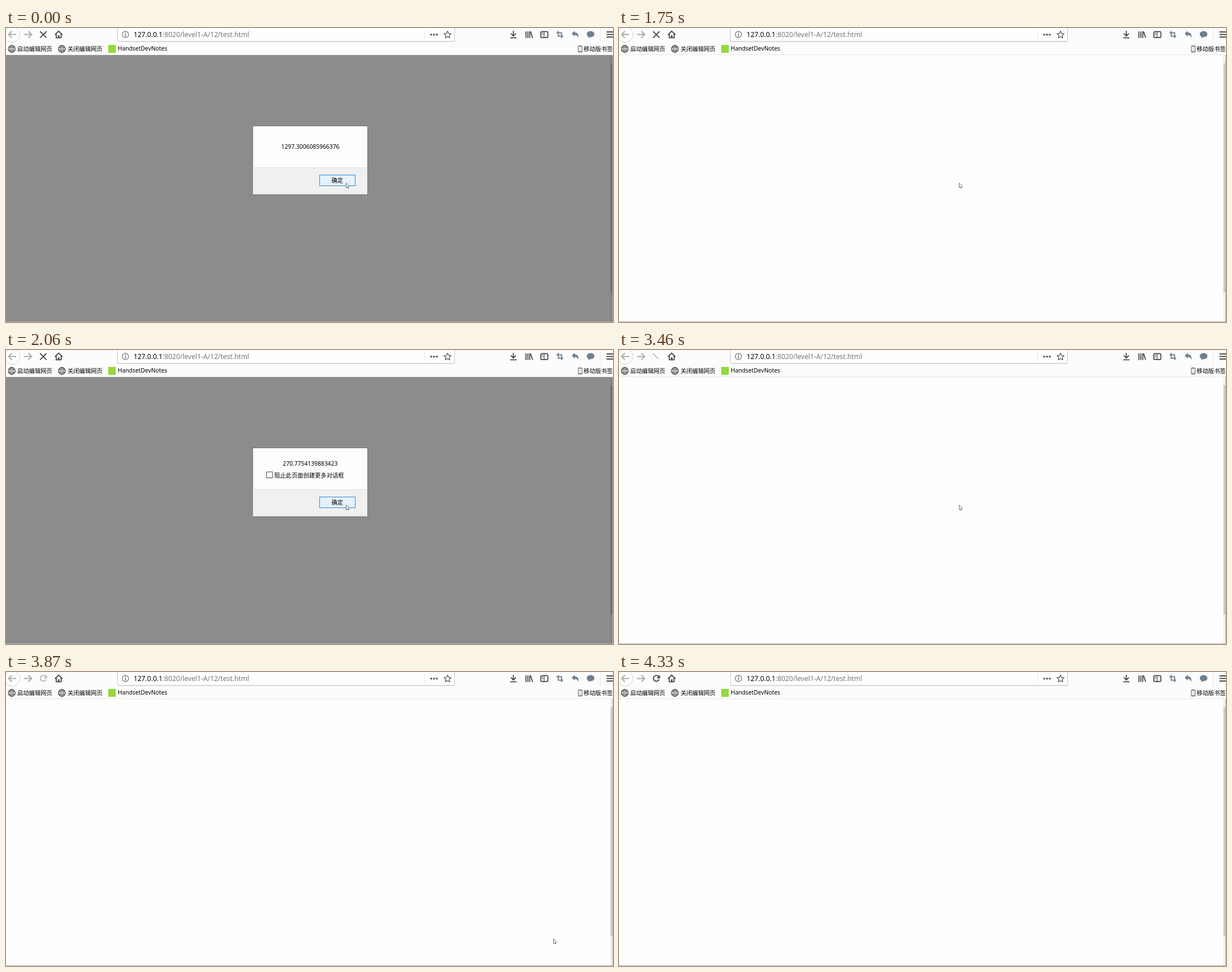
Animation of 1075x521 px, one loop 4.79 s. Source, as an HTML page:

```html
<!DOCTYPE html>
<html lang="zh-CN">
<head>
<meta charset="utf-8">
<title>Alert loop</title>
<style>
html, body { margin: 0; width: 100%; height: 100%; overflow: hidden; background: #fefefe; }
svg { display: block; width: 100%; height: 100%; }
text { font: 10.3px "Noto Sans", "Noto Sans CJK SC", "Noto Sans CJK", "Noto Sans CJK JP", sans-serif; fill: #000; white-space: pre; }
.url { font-size: 12.1px; }
.mid { text-anchor: middle; }
.line { fill: none; stroke: #47474b; stroke-width: 1.8; }
.thin { stroke-width: 1.2; }
.dim { stroke: #aaaaac; }
.steel { fill: #6f7f8f; }

/* 4790 ms loop, hard cuts */
.cut { animation: 4790ms step-end infinite; }
.modal { animation-name: modal; }
.first { animation-name: first; }
.second { animation-name: second; }
.button { fill: #e5f1fb; stroke: #2a8ad9; animation-name: press; }
.stop { animation-name: stop; }
.fade { animation-name: fade; }
.draw { animation-name: draw; }
.pale { animation-name: pale; }
.reload { animation-name: reload; }
.cursor { animation-name: point; }

@keyframes modal {
  0%, 43.006% { visibility: visible; }
  36.534%, 72.233%, 100% { visibility: hidden; }
}
@keyframes first {
  0% { visibility: visible; }
  36.534%, 100% { visibility: hidden; }
}
@keyframes second {
  0%, 72.233%, 100% { visibility: hidden; }
  43.006% { visibility: visible; }
}
@keyframes press {
  0% { fill: #e5f1fb; stroke: #2a8ad9; }
  64.718%, 100% { fill: #cce4f7; stroke: #2a6fa8; }
}
@keyframes stop {
  0% { visibility: visible; }
  72.233%, 100% { visibility: hidden; }
}
@keyframes fade {
  0%, 75.156%, 100% { visibility: hidden; }
  72.233% { visibility: visible; }
}
@keyframes draw {
  0%, 80.793%, 100% { visibility: hidden; }
  75.156% { visibility: visible; }
}
@keyframes pale {
  0%, 83.716%, 100% { visibility: hidden; }
  80.793% { visibility: visible; }
}
@keyframes reload {
  0% { visibility: hidden; }
  83.716%, 100% { visibility: visible; }
}
@keyframes point {
  0% { transform: translate(602px, 274px); }
  80.793% { transform: translate(969px, 472px); }
  83.716% { transform: translate(1033px, 513px); }
  90.396%, 100% { transform: translate(1100px, 600px); }
}
</style>
</head>
<body>
<svg viewBox="0 0 1075 521" preserveAspectRatio="none">
  <defs>
    <g id="globe" fill="none" stroke="#454545">
      <circle r="6" stroke-width="1.4"/>
      <ellipse rx="2.9" ry="6"/>
      <path d="M-5.4 -2.3H5.4M-5.4 2.3H5.4M0 -6V6" stroke-width=".8"/>
    </g>
    <g id="spin">
      <path d="M70.4 8.2A5.2 5.2 0 1 0 71 13.2" fill="none" stroke="currentColor" stroke-width="1.8"/>
      <path d="M72.6 5.2V11.2H66.8Z" fill="currentColor"/>
    </g>
  </defs>

  <!-- toolbar -->
  <rect width="1075" height="48" fill="#fcfcfc"/>
  <rect y="47" width="1075" height="1" fill="#e6e6e7"/>
  <circle cx="11" cy="11.5" r="13.8" fill="#fdfdfd" stroke="#d4d4d5"/>
  <path class="line dim" d="M18 11.5H5M10.5 5.5L4.5 11.5L10.5 17.5"/>
  <path class="line dim" d="M32 11.5H45M39.5 5.5L45.5 11.5L39.5 17.5"/>
  <path class="line cut stop" d="M60.3 6L71.7 17.4M71.7 6L60.3 17.4"/>
  <path class="line dim thin cut fade" d="M60 6L70 16"/>
  <path class="line dim cut draw" d="M66 6.4A5.2 5.2 0 0 0 66 16.8"/>
  <use href="#spin" class="cut pale" color="#b4b4b6"/>
  <use href="#spin" class="cut reload" color="#3c3c40"/>
  <path class="line" d="M86.7 12L93.3 5.6L99.9 12M89 10.8V17.3H97.6V10.8"/>
  <path d="M92 13H94.7V17.5H92Z" fill="#47474b"/>

  <!-- address bar -->
  <rect x="197" y="-6" width="598" height="31" rx="2" fill="#e6e6e7"/>
  <rect x="197.5" y="-6" width="597" height="29.7" rx="2" fill="#fefefe" stroke="#c6c6c8"/>
  <circle cx="211.5" cy="11.5" r="5.6" fill="none" stroke="#66666a" stroke-width="1.1"/>
  <path d="M211.5 10.5V15M211.5 7.8V9.4" stroke="#66666a" stroke-width="1.5"/>
  <text class="url" x="226" y="16">127.0.0.1<tspan fill="#77777a">:8020/level1-A/12/test.html</tspan></text>
  <path d="M741.5 4V19" stroke="#e6e6e7"/>
  <g fill="#55555a">
    <circle cx="753" cy="11.7" r="1.8"/>
    <circle cx="758" cy="11.7" r="1.8"/>
    <circle cx="763" cy="11.7" r="1.8"/>
  </g>
  <path class="line thin" stroke-linejoin="round" d="M782 5.6L783.9 9.6L788.3 10.1L785 13.1L785.9 17.5L782 15.3L778.1 17.5L779 13.1L775.7 10.1L780.1 9.6Z"/>

  <!-- tools -->
  <path class="line" d="M898.5 5V14M894 9.7L898.5 14.2L903 9.7M893 17.4H904.2"/>
  <path class="line" d="M920.8 6V17.8M924.3 6V17.8M927.6 6V17.8M929 6.3L932.7 17.5"/>
  <rect class="line" x="947.2" y="6.3" width="12.4" height="10.6" rx="2"/>
  <path class="line thin" d="M953 6.5V16.8M949.2 9.2H951.3M949.2 11.5H951.3"/>
  <path class="line" style="stroke:#6f7f8f" d="M978 5.2V14.5H987M974.8 8.5H984V18"/>
  <path class="steel" d="M1001.8 10L1007.5 4.8V8C1012 8 1015 11 1013.2 17.8C1012.4 13.6 1010.5 12.3 1007.5 12.3V15.2Z"/>
  <path class="steel" d="M1035.3 5.6C1039.3 5.6 1042 8 1042 10.9C1042 13.8 1039.3 16 1035.3 16L1031 17.8L1031.5 15.2C1029.6 14.2 1028.6 12.7 1028.6 10.9C1028.6 8 1031.3 5.6 1035.3 5.6Z"/>
  <path d="M1052.5 0V24" stroke="#e6e6e7"/>
  <path class="line" d="M1063.5 7H1075M1063.5 11.5H1075M1063.5 16H1075"/>

  <!-- bookmarks -->
  <use href="#globe" x="10.2" y="37"/>
  <text x="20" y="40.6">启动编辑网页</text>
  <use href="#globe" x="99" y="37"/>
  <text x="109" y="40.6">关闭编辑网页</text>
  <rect x="181" y="30" width="13.5" height="14" fill="#96d83f"/>
  <text x="198" y="40.4">HandsetDevNotes</text>
  <rect x="1013.5" y="31.5" width="7" height="11.5" rx="1.5" fill="#e8e8ea" stroke="#828287" stroke-width="1.2"/>
  <path d="M1014 32.2H1020M1014 41.8H1020" stroke="#828287" stroke-width="1.6"/>
  <text x="1023" y="40.6">移动版书签</text>

  <!-- page -->
  <rect y="48" width="1075" height="473" fill="#fefefe"/>
  <rect x="1070" y="48" width="5" height="473" fill="#f0f0f0"/>
  <rect x="1070.5" y="62.5" width="4" height="406" fill="#cbcbcb"/>
  <rect class="cut modal" y="48" width="1075" height="472" fill="#000" fill-opacity=".452"/>
  <path d="M1074.5 48V521M0 520.5H1075" stroke="#b2b2b2"/>

  <!-- dialog -->
  <g class="cut modal">
    <rect x="437" y="173.5" width="203.5" height="121.5" fill="#fdfdfd" stroke="#707070"/>
    <rect x="437.5" y="247.5" width="202.5" height="47" fill="#f0f0f0"/>
    <path d="M437.5 247.5H640" stroke="#dfdfdf"/>
    <rect class="cut button" x="555.5" y="260.5" width="63" height="19"/>
    <text class="mid" x="586.8" y="273.9">确定</text>
  </g>
  <text class="mid cut first" x="539" y="214.3">1297.3006085966376</text>
  <g class="cut second">
    <text class="mid" x="538.8" y="204.6">270.7754139883423</text>
    <rect x="461.5" y="216" width="10.5" height="10.5" fill="#fff" stroke="#444"/>
    <text x="475" y="225.5">阻止此页面创建更多对话框</text>
  </g>

  <path class="cut cursor" d="M.6 .8V9.2L2.5 7.7L3.7 10L4.8 9.5L3.9 7.2L6.2 6.8Z" fill="#fff" stroke="#4a4a4a" stroke-width=".8"/>
</svg>
</body>
</html>
```
